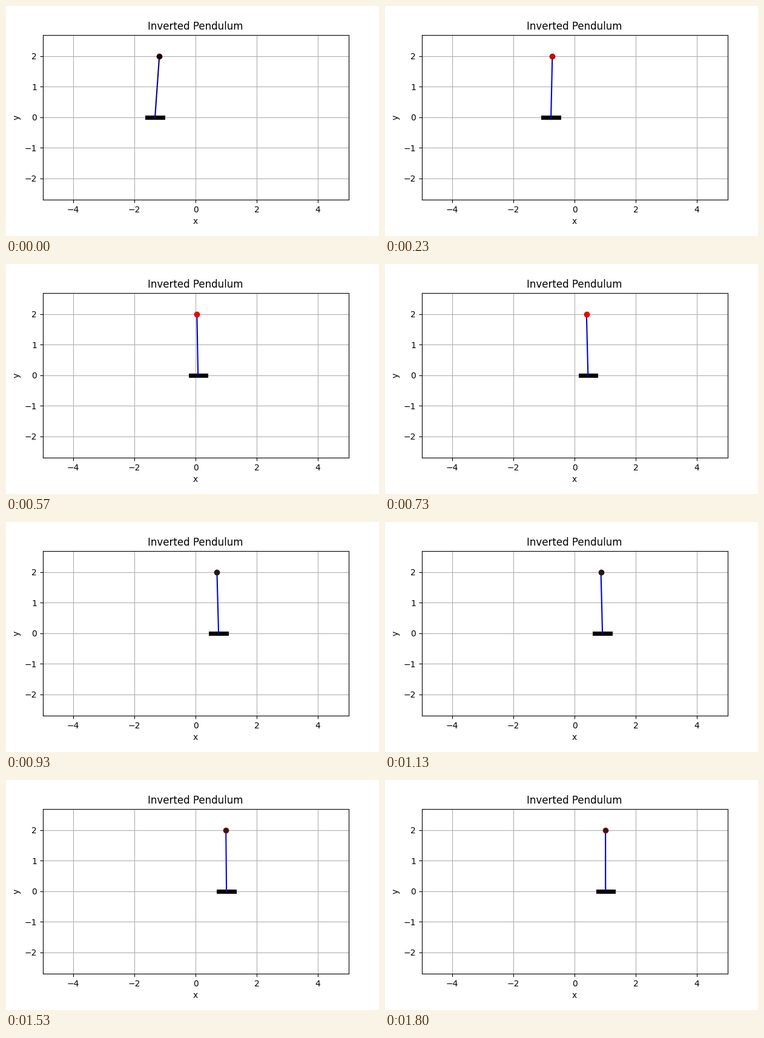
Animation, 616 px wide and 380 px high, one loop 1830 ms. Source, as a matplotlib script:

```python
import matplotlib.pyplot as plt
import numpy as np
from matplotlib.animation import FuncAnimation

W, H, DPI = 616, 380, 100
LOOP_MS, TICK_MS = 1830, 10
FPS = 30
LENGTH, HALF_CART = 2.0, 0.25

# Cart position and bob lead (x units) at a few simulation steps
CART = ([0, 7, 16, 17, 28, 32, 34, 46, 54],
        [-1.327, -0.772, 0.0, 0.08, 0.752, 0.871, 0.911, 1.01, 1.012])
LEAD = ([0, 7, 17, 28, 34, 46, 54],
        [0.142, 0.044, -0.036, -0.053, -0.05, -0.018, -0.001])

# First step, bob face, bob edge, pole
SHADES = [(0, "#1c0000", "#1c0000", "#00008c"),
          (4, "#cc0808", "#a01010", "#0000dd"),
          (12, "#f00000", "#e00000", "#0000dd"),
          (23, "#221818", "#221818", "#0000dd"),
          (40, "#2a1c1c", "#7a0c0c", "#0808e0"),
          (50, "#2a1c1c", "#8c0c0c", "#0000c8")]


def smooth(points, s):
    """Cubic Hermite curve through the given points."""
    xs, ys = map(np.array, points)
    slopes = np.gradient(ys, xs)
    i = int(np.clip(np.searchsorted(xs, s, side="right") - 1, 0, len(xs) - 2))
    h = xs[i + 1] - xs[i]
    u = (s - xs[i]) / h
    return ((1 + 2 * u) * (1 - u) ** 2 * ys[i]
            + u * (1 - u) ** 2 * h * slopes[i]
            + u * u * (3 - 2 * u) * ys[i + 1]
            + u * u * (u - 1) * h * slopes[i + 1])


fig = plt.figure(figsize=(W / DPI, H / DPI), dpi=DPI)
ax = fig.add_axes([60.6 / W, 60.2 / H, 505 / W, 272 / H])
ax.set(xlim=(-5, 5), ylim=(-136 / 50.5, 136 / 50.5),
       xlabel="x", ylabel="y", title="Inverted Pendulum")
ax.set_xticks(range(-4, 5, 2))
ax.set_yticks(range(-2, 3))
ax.grid(True)

cart, = ax.plot([], [], "k-", lw=5)
pole, = ax.plot([], [], "-", lw=1.5)
bob, = ax.plot([], [], "o", ms=6)


def update(tick):
    step = int((tick * TICK_MS + TICK_MS / 2) * FPS // 1000)
    x = smooth(CART, step)
    lead = smooth(LEAD, step)
    top = np.sqrt(LENGTH ** 2 - lead ** 2)
    cart.set_data([x - HALF_CART, x + HALF_CART], [0, 0])
    pole.set_data([x, x + lead], [0, top])
    bob.set_data([x + lead], [top])

    _, face, edge, line = [s for s in SHADES if s[0] <= step][-1]
    bob.set_markerfacecolor(face)
    bob.set_markeredgecolor(edge)
    pole.set_color(line)
    return cart, pole, bob


anim = FuncAnimation(fig, update, frames=LOOP_MS // TICK_MS, interval=TICK_MS,
                     init_func=lambda: update(0), repeat=True, repeat_delay=0)
plt.show()
```
